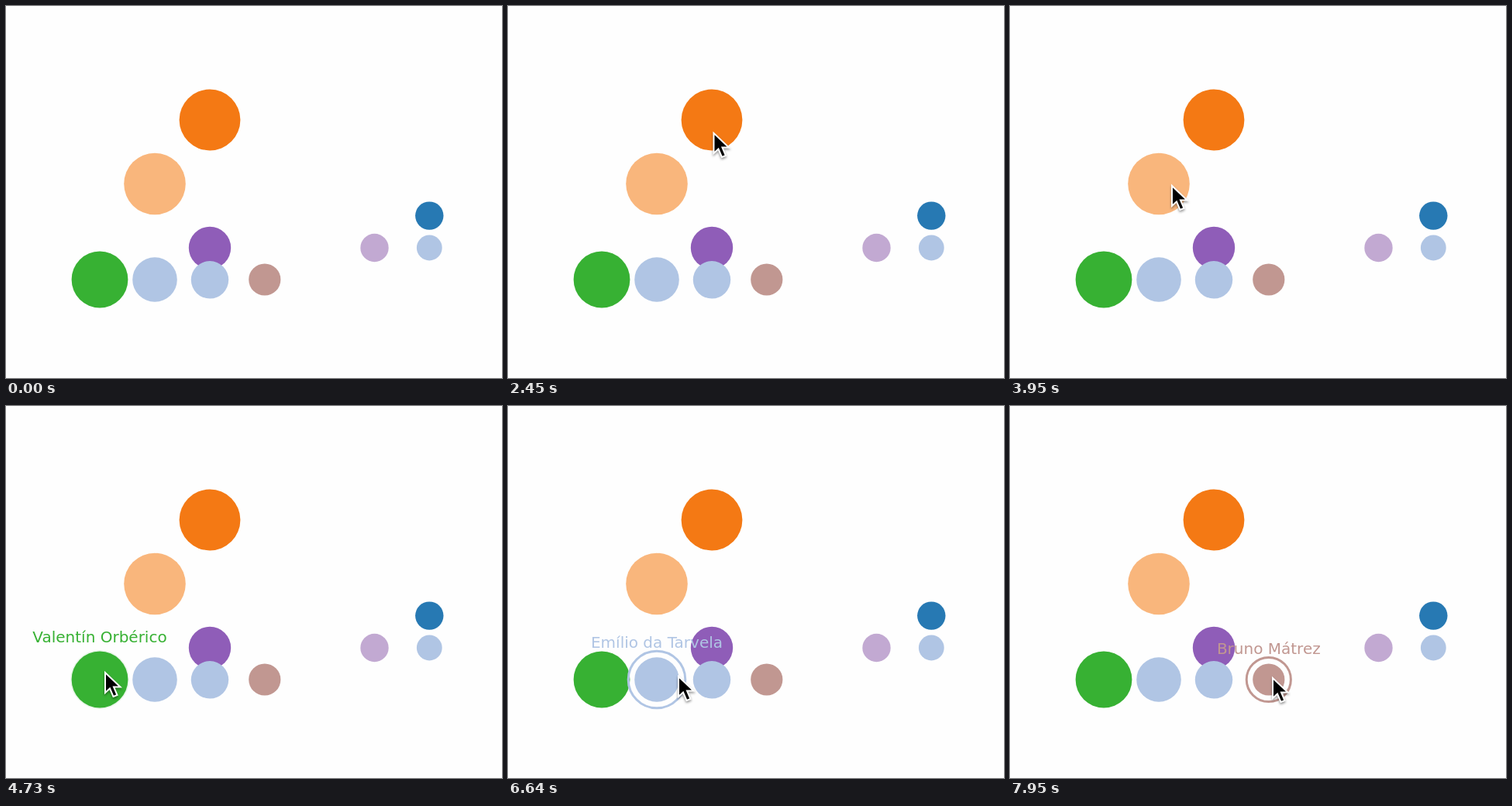
An HTML page that plays this animation: 640 by 480 pixels, repeating every 8000 ms.

```html
<!DOCTYPE html>
<html lang="en">
<head>
<meta charset="utf-8">
<title>Bubble chart with hover labels</title>
<style>
  html, body { margin: 0; width: 100%; height: 100%; overflow: hidden; background: #fefefe; }
  svg { display: block; width: 640px; height: 480px; }
  #label { font: 20px "DejaVu Sans", sans-serif; text-anchor: middle; }
  #ring { fill: none; stroke-width: 3; }
  #cursor { filter: drop-shadow(0 2px 1.5px #0006); }
</style>
</head>
<body>
<svg viewBox="0 0 640 480">
  <g id="bubbles"></g>
  <circle id="ring"/>
  <text id="label"></text>
  <path id="cursor" d="M0 0V26L6 20.5L10.5 31L15.5 29L11 18.5H19.5Z" stroke="#fff" stroke-width="2"/>
</svg>
<script>
const LOOP = 8000, RING_GROWTH = 500, RING_GAP = 8, LABEL_GAP = 12;

const bubbles = {
  orange: { x: 263, y: 147, r: 39.4, color: '#f47914' },
  peach: { x: 192, y: 229.5, r: 39.8, color: '#f9b67c' },
  purple: { x: 263, y: 312, r: 27.2, color: '#8f5db8' },
  green: { x: 121, y: 353, r: 36.4, color: '#37b133' },
  sky: { x: 192, y: 353, r: 28.8, color: '#b0c5e4' },
  skyMid: { x: 263, y: 353.3, r: 24.2, color: '#b0c5e4' },
  brown: { x: 333.8, y: 353, r: 20.6, color: '#c19791' },
  lilac: { x: 475.5, y: 312, r: 18.2, color: '#c2a9d2' },
  blue: { x: 546.3, y: 270.6, r: 18.2, color: '#2779b3' },
  skySmall: { x: 546.3, y: 312, r: 16.4, color: '#b0c5e4' }
};

const hovers = [
  { from: 2540, to: 3720, bubble: bubbles.orange, name: 'Noël Tirandet' },
  { from: 4680, to: 5660, bubble: bubbles.green, name: 'Valentín Orbérico' },
  { from: 5740, to: 6800, bubble: bubbles.sky, name: 'Emílio da Tarvela' },
  { from: 7420, to: LOOP, bubble: bubbles.brown, name: 'Bruno Mátrez' }
];

// Pointer stops: time, x, y
const pointer = [
  [200, 335, 434], [950, 269, 164], [2300, 269, 164], [2700, 258, 164],
  [3450, 258, 164], [4650, 128, 344], [5300, 128, 344], [5800, 185, 348],
  [6050, 185, 348], [6600, 220, 349], [6700, 220, 349], [7650, 339, 351], [LOOP, 339, 351]
];

const byId = id => document.getElementById(id);
const ring = byId('ring'), label = byId('label'), cursor = byId('cursor');
const set = (node, attrs) => {
  for (const key in attrs) node.setAttribute(key, attrs[key]);
};
const easeInOut = p => p < 0.5 ? 4 * p ** 3 : 1 - 4 * (1 - p) ** 3;

for (const { x, y, r, color } of Object.values(bubbles)) {
  const circle = document.createElementNS('http://www.w3.org/2000/svg', 'circle');
  set(circle, { cx: x, cy: y, r, fill: color });
  byId('bubbles').append(circle);
}

function drawHover(time) {
  const hover = hovers.find(h => time >= h.from && time < h.to);
  const visibility = hover ? 'visible' : 'hidden';
  set(ring, { visibility });
  set(label, { visibility });
  if (!hover) return;
  const { x, y, r, color } = hover.bubble;
  const progress = Math.min(1, (time - hover.from) / RING_GROWTH);
  set(ring, { cx: x, cy: y, r: r + RING_GAP * easeInOut(progress), stroke: color, opacity: progress });
  set(label, { x, y: y - r - LABEL_GAP, fill: color });
  label.textContent = hover.name;
}

function drawPointer(time) {
  const next = pointer.findIndex(stop => stop[0] > time);
  set(cursor, { visibility: next > 0 ? 'visible' : 'hidden' });
  if (next < 1) return;
  const [t0, x0, y0] = pointer[next - 1], [t1, x1, y1] = pointer[next];
  const p = (time - t0) / (t1 - t0), s = p * p * (3 - 2 * p);
  set(cursor, { transform: `translate(${x0 + (x1 - x0) * s} ${y0 + (y1 - y0) * s})` });
}

const start = performance.now();
function frame() {
  const time = (performance.now() - start) % LOOP;
  drawHover(time);
  drawPointer(time);
  requestAnimationFrame(frame);
}
frame();
</script>
</body>
</html>
```
